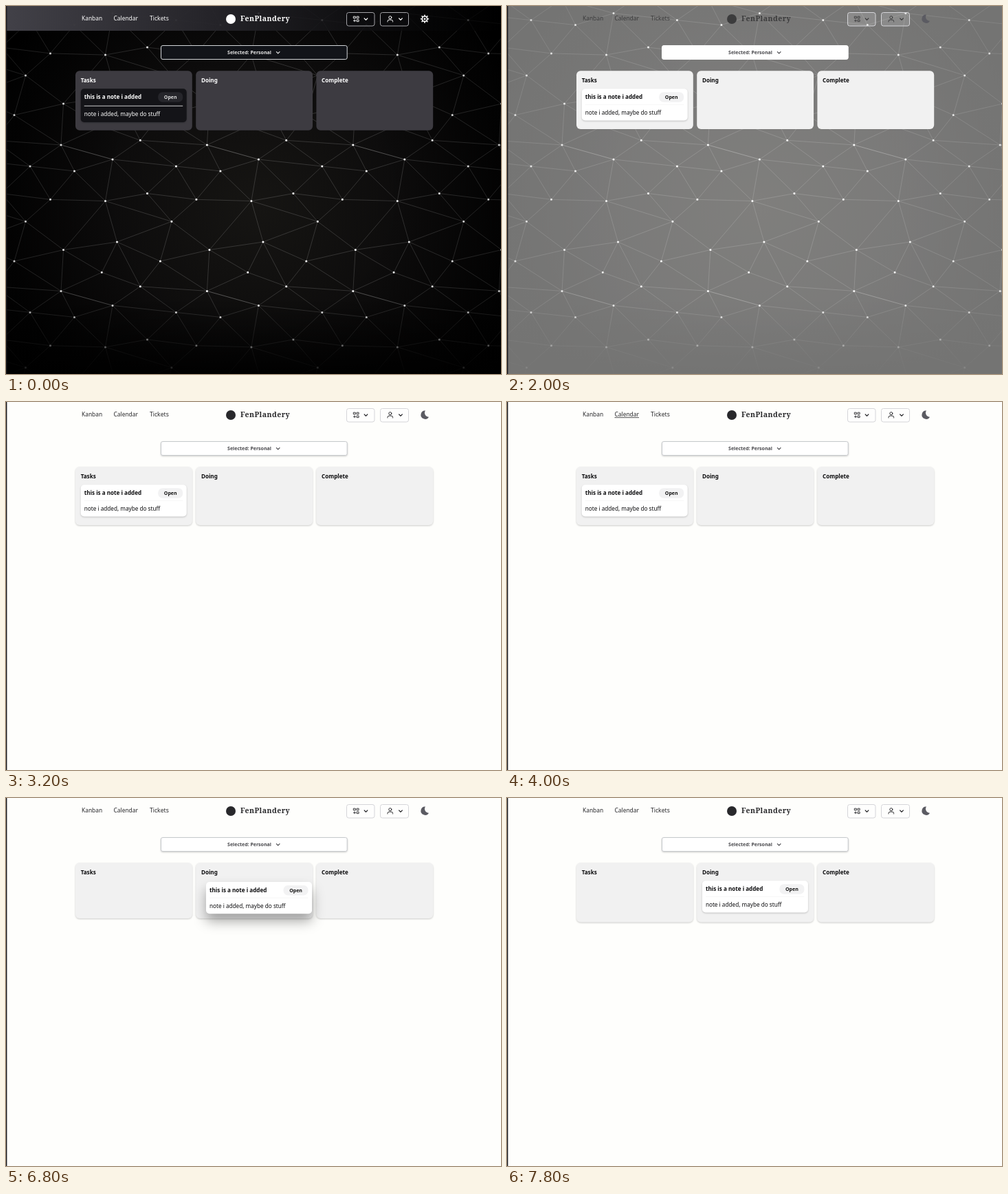
An HTML page for the animation above (8 s loop, 720 by 535 pixels).

```html
<!DOCTYPE html>
<html lang="en">
<head>
<meta charset="utf-8">
<title>Task board</title>
<style>
html, body { margin: 0; width: 100%; height: 100%; overflow: hidden; background: #fefefc; }
svg { display: block; width: 720px; height: 535px; font: 8.1px "Noto Sans", "Open Sans", sans-serif; }
.dark {
  --fg: #fff; --text: #fff; --col: #3d3b41; --card: #141418; --pill: #26262b; --pillText: #ddd;
  --btn: #0c0c0ecc; --edge: #a2a2a6; --select: #121419; --selectEdge: #d2d5d8; --selectText: #e8e8e8; --rule: #ddd;
}
.light, .mid {
  --fg: #28282b; --text: #0c0c0e; --col: #f1f1f1; --card: #fff; --pill: #f2f2f3; --pillText: #111;
  --btn: #ffffff26; --edge: #d5d5d9; --select: #fff; --selectEdge: #c6c9cc; --selectText: #47474b; --rule: #f6f6f6;
}
.mid { --fg: #3c3c3d; --selectEdge: #fff; }
.fg { fill: var(--fg); }
.line { fill: none; stroke: var(--fg); stroke-width: 1; stroke-linecap: round; stroke-linejoin: round; }
.b { font-weight: 700; }
.text { fill: var(--text); }
.btn { fill: var(--btn); stroke: var(--edge); }
.col { fill: var(--col); }
.light .col, .light .select { filter: drop-shadow(0 1px 1px #0003); }
.select { fill: var(--select); stroke: var(--selectEdge); }
.card { fill: var(--card); filter: drop-shadow(0 1px 1px #0003); }
.drag .card { filter: drop-shadow(0 11px 9px #0005); }
.dark .moon, .light .sun, .mid .sun, .light .bar, .mid .bar { display: none; }
</style>
</head>
<body>
<svg id="stage" class="dark" viewBox="0 0 720 535">
  <defs>
    <radialGradient id="glow" gradientUnits="userSpaceOnUse" cx="365" cy="290" r="420">
      <stop stop-color="#161513"/><stop offset=".5" stop-color="#0d0c0c"/><stop offset="1" stop-color="#000"/>
    </radialGradient>
    <radialGradient id="edge" gradientUnits="userSpaceOnUse" cx="360" cy="270" r="430">
      <stop offset=".4" stop-opacity="0"/><stop offset="1" stop-opacity=".3"/>
    </radialGradient>
    <linearGradient id="floor" x2="0" y2="1">
      <stop stop-opacity="0"/><stop offset=".9" stop-opacity=".82"/><stop offset="1" stop-opacity=".92"/>
    </linearGradient>
    <linearGradient id="nav">
      <stop stop-color="#424148"/><stop offset=".45" stop-color="#242328" stop-opacity=".95"/>
      <stop offset=".85" stop-color="#060607" stop-opacity=".75"/><stop offset="1" stop-opacity=".65"/>
    </linearGradient>
  </defs>
  <rect width="720" height="535" fill="#fefefc"/>
  <g id="night">
    <rect width="720" height="535" fill="url(#glow)"/>
    <path id="mesh" fill="none" stroke="#fff" stroke-opacity=".22" stroke-width=".7"/>
    <path id="dots" stroke="#fff" stroke-width="3" stroke-linecap="round"/>
    <rect width="720" height="535" fill="url(#edge)"/>
    <rect y="425" width="720" height="110" fill="url(#floor)"/>
  </g>
  <rect class="bar" width="720" height="36" fill="url(#nav)"/>
  <rect width="1.4" height="535" fill="#18181d"/>

  <g class="fg" font-size="8.4">
    <text x="110" y="21">Kanban</text>
    <text x="156.5" y="21">Calendar</text>
    <text x="209" y="21" font-size="8.6">Tickets</text>
    <rect id="underline" x="156.5" y="22.3" width="35.5" height=".8"/>
    <circle cx="327" cy="19" r="7"/>
    <text class="b" x="341" y="21.8" font-size="10.5" letter-spacing=".45" style="font-family:'Noto Serif',serif">FenPlandery</text>
  </g>
  <rect class="btn" x="495.5" y="9.5" width="40.5" height="19.5" rx="3"/>
  <rect class="btn" x="544.5" y="9.5" width="41" height="19.5" rx="3"/>
  <g class="line">
    <path stroke-width=".9" d="M505.7 15.2h2.6v2.6h-2.6zM510.5 15.2h2.6v2.6h-2.6zM510.5 20h2.6v2.6h-2.6zM505.5 21.3h3M507 19.8v3"/>
    <circle cx="558.8" cy="16.7" r="2"/>
    <path d="M555 23v-.6a2.3 2.3 0 0 1 2.3-2.3h3a2.3 2.3 0 0 1 2.3 2.3v.6"/>
    <path stroke-width="1.2" d="M521.2 18l2.3 2.3 2.3-2.3M571.7 18l2.3 2.3 2.3-2.3"/>
  </g>
  <g class="sun" fill="none" stroke="#fff">
    <circle cx="609" cy="18.7" r="3.7" stroke-width="1.7"/>
    <circle cx="609" cy="18.7" r="1.5" fill="#fff" stroke="none"/>
    <path id="rays" stroke-width="1.6" stroke-linecap="round"/>
  </g>
  <path class="moon" fill="#5b5b62" d="M610 12.4A6.2 6.2 0 1 0 615 21.7A6 6 0 0 1 610 12.4z"/>

  <rect class="select" x="225.5" y="57.5" width="270.7" height="20" rx="2.5"/>
  <text x="354" y="70" font-size="7" font-weight="600" text-anchor="middle" fill="var(--selectText)">Selected: Personal</text>
  <path d="M393.4 66.6l2.3 2.3 2.3-2.3" fill="none" stroke="var(--selectText)" stroke-width="1.2" stroke-linecap="round"/>

  <g id="columns"></g>
  <g id="note">
    <rect id="card" class="card" width="154" rx="5"/>
    <text class="b text" x="5" y="14.6">this is a note i added</text>
    <rect x="112.5" y="5" width="36" height="14.5" rx="6.5" fill="var(--pill)"/>
    <text class="b" x="130.5" y="15" font-size="7" text-anchor="middle" fill="var(--pillText)">Open</text>
    <rect id="rule" x="5" width="143.5" height=".9" fill="var(--rule)"/>
    <text id="body" class="text" x="5" font-size="8.2">note i added, maybe do stuff</text>
  </g>
</svg>
<script>
const $ = id => document.getElementById(id);
const set = (id, attrs) => { for (const k in attrs) $(id).setAttribute(k, attrs[k]); };

// Repeating mesh: named nodes; a lower-case end lies one tile down, "+" marks one tile right
const TILE = 212.4;
const nodes = {
  A: [80, 202], B: [195.3, 195.3], C: [155, 223], D: [35, 233], E: [99.5, 240], F: [64.5, 281.3], G: [205.5, 272.5],
  H: [144.5, 283.5], I: [28.5, 313.3], J: [83.5, 354.5], K: [161.5, 343], L: [12, 371], M: [139.3, 387.3]
};
const links = `AC AD AE CE DE DF EF CB CG CH BD+ BA+ CD+ GD+ GF+ GI+ FH HG EH FI HI+ IJ IL HJ HK JK KI+ KL+
  LJ La Ja JM Ma KM Mb Kb bL+ ac`.trim().split(/\s+/);

function point(name, right, dx, dy) {
  const [x, y] = nodes[name.toUpperCase()];
  const down = name > "Z" ? TILE : 0;
  return `${x + dx + (right ? TILE : 0)} ${y + dy + down}`;
}

let mesh = "", dots = "";
for (let i = -1; i < 4; i++) for (let j = -1; j < 2; j++) {
  const dx = i * TILE, dy = j * TILE;
  for (const [a, b, right] of links) mesh += `M${point(a, 0, dx, dy)}L${point(b, right, dx, dy)}`;
  for (const n in nodes) dots += `M${point(n, 0, dx, dy)}h0`;
}
set("mesh", { d: mesh });
set("dots", { d: dots });

let rays = "";
for (let i = 0; i < 8; i++) {
  const c = Math.cos(i * Math.PI / 4), s = Math.sin(i * Math.PI / 4);
  rays += `M${609 + 4.4 * c} ${18.7 + 4.4 * s}L${609 + 5.5 * c} ${18.7 + 5.5 * s}`;
}
set("rays", { d: rays });

$("columns").innerHTML = ["Tasks", "Doing", "Complete"].map((title, i) => {
  const x = 101 + i * 175.2;
  return `<rect class="col" x="${x}" y="94.3" width="169.8" rx="6"/><text class="b text" x="${x + 7.7}" y="111">${title}</text>`;
}).join("");
const columns = document.querySelectorAll(".col");

const mix = (a, b, p) => a + (b - a) * p;
const ease = (t, from, to) => {
  const p = Math.min(1, Math.max(0, (t - from) / (to - from)));
  return p * p * (3 - 2 * p);
};

function draw(now) {
  const t = Math.floor(now % 8000 / 200) * 200; // five pictures a second
  const theme = t < 2000 ? "dark" : t < 2200 ? "mid" : "light";
  const dark = theme == "dark";
  $("stage").setAttribute("class", theme);
  set("night", { opacity: { dark: 1, mid: .54, light: 0 }[theme] });
  set("underline", { opacity: t == 4000 ? 1 : 0 });

  const carry = ease(t, 5000, 6200), drop = ease(t, 6800, 7200);
  const x = mix(mix(108.7, 291, carry), 283.9, drop);
  const y = mix(mix(120.2, 122, carry), 120.2, drop);
  set("note", { transform: `translate(${x} ${y})`, class: carry > 0 && drop < 1 ? "drag" : "" });
  set("card", { height: dark ? 48.8 : 46.3 });
  set("rule", { y: dark ? 24.6 : 22.8 });
  set("body", { y: dark ? 39.4 : 37.5 });

  const bottom = dark ? 180.7 : mix(mix(179, 175, ease(t, 5200, 5800)), 180.5, drop);
  columns.forEach(c => c.setAttribute("height", bottom - 94.3));
  requestAnimationFrame(draw);
}
draw(0);
</script>
</body>
</html>
```
